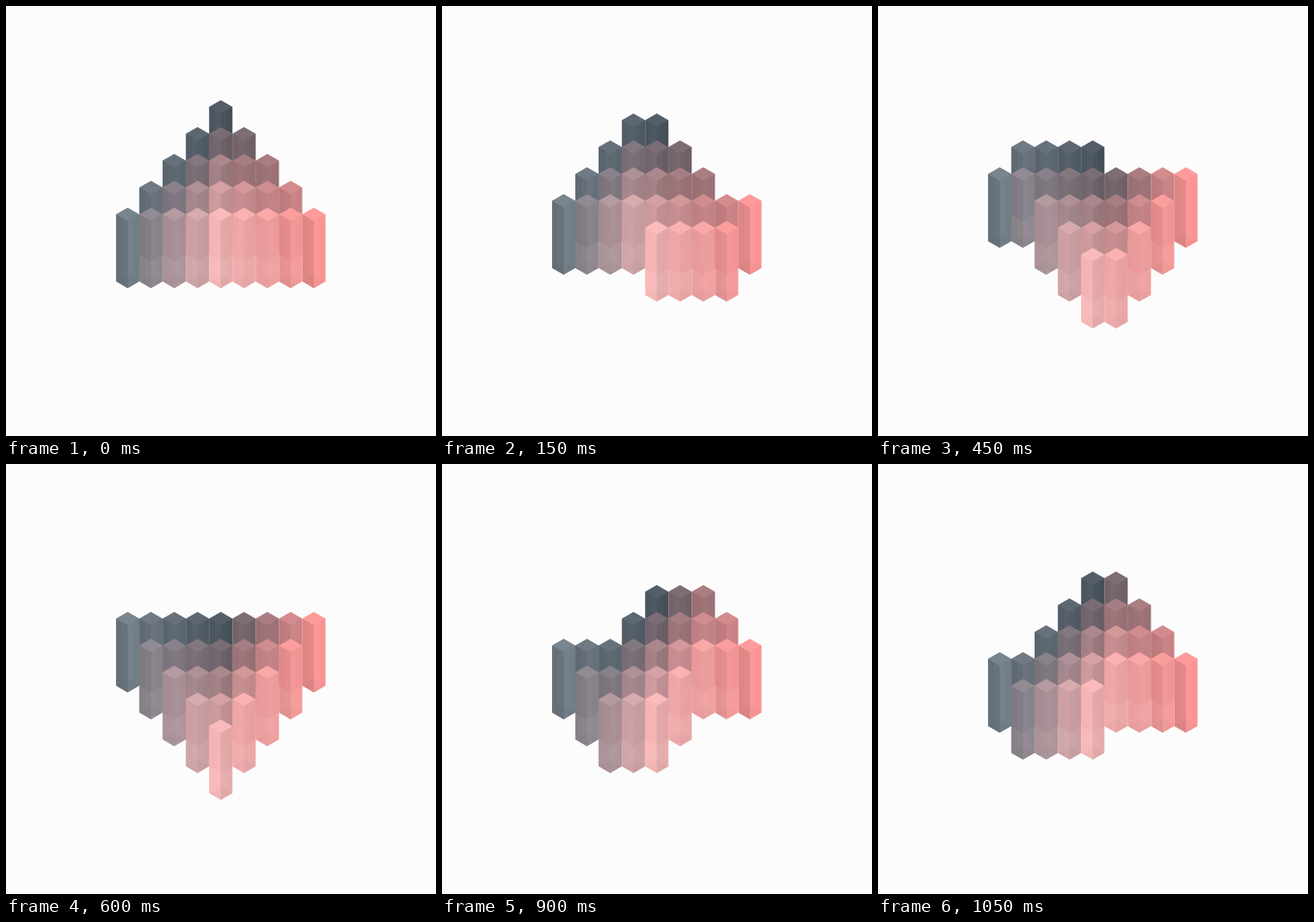
Write an HTML page with a canvas that moves like this. It is 500 by 500 pixels and loops after 1.2 s.

```html
<!DOCTYPE html>
<html lang="en">
<head>
<meta charset="utf-8">
<title>Prism wave</title>
<style>
  html, body { margin: 0; width: 100%; height: 100%; overflow: hidden; background: #fcfcfc; }
  canvas { display: block; width: 500px; height: 500px; }
</style>
</head>
<body>
<canvas id="stage" width="500" height="500"></canvas>
<script>
const ctx = document.getElementById('stage').getContext('2d');
const STEP_MS = 150, STEPS = 8, SIZE = 5;
const U = 15.625;                    // vertical grid unit
const W = U * Math.sqrt(3) / 2;      // half width of a prism
const CX = 249.75, CY = 250;

const CORNERS = {
  back: [66, 78, 89], right: [255, 145, 145],
  left: [107, 119, 131], front: [255, 188, 188]
};

const mix = (a, b, k) => a.map((v, n) => v + (b[n] - v) * k);
const rgb = c => `rgb(${c.map(Math.round)})`;

function fill(points, style) {
  ctx.fillStyle = style;
  ctx.beginPath();
  points.forEach(([x, y]) => ctx.lineTo(x, y));
  ctx.fill();
}

const prisms = [];
for (let i = 0; i < SIZE; i++) {
  for (let j = 0; j < SIZE; j++) {
    const u = i / (SIZE - 1), v = j / (SIZE - 1);
    const color = mix(mix(CORNERS.back, CORNERS.right, u), mix(CORNERS.left, CORNERS.front, u), v);
    prisms.push({ col: i - j, depth: i + j, color: rgb(color) });
  }
}
prisms.sort((a, b) => a.depth - b.depth);

// Triangle wave over eight columns, from -2 to 2.
const wave = n => Math.abs(((n + 4) % 8 + 8) % 8 - 4) - 2;

function drawPrism({ col, depth, color }, step) {
  const x = CX + col * 2 * W;
  const y = CY + (depth - 4 - 3 + wave(col + step)) * U;
  const l = x - W, r = x + W;
  const side = y + U / 2, front = y + U;
  const low = y + 5.5 * U, bottom = y + 6 * U;

  ctx.globalAlpha = 0.94;
  fill([[x, y], [r, side], [r, low], [x, bottom], [l, low], [l, side]], color);
  ctx.globalAlpha = 1;

  const leftFace = [[l, side], [x, front], [x, bottom], [l, low]];
  const rightFace = [[r, side], [x, front], [x, bottom], [r, low]];
  const edge = Math.abs(col) / 4;
  fill(leftFace, `rgba(0,0,0,${0.03 + 0.09 * edge})`);
  fill(rightFace, `rgba(0,0,0,${0.1 - 0.08 * edge})`);
  fill([[x, y], [r, side], [x, front], [l, side]], 'rgba(255,255,255,0.04)');

  // Faint inner core and base seen through the faces.
  const h = W * 0.5;
  fill([[x - h, front - U / 4], [x, front], [x + h, front - U / 4],
        [x + h, bottom - U / 4], [x, bottom], [x - h, bottom - U / 4]], 'rgba(255,255,255,0.025)');
  fill([[x, bottom - U], [r, low], [x, bottom], [l, low]], 'rgba(0,0,0,0.025)');
}

function draw() {
  const step = Math.floor(performance.now() / STEP_MS) % STEPS;
  ctx.fillStyle = '#fcfcfc';
  ctx.fillRect(0, 0, 500, 500);
  prisms.forEach(p => drawPrism(p, step));
  requestAnimationFrame(draw);
}
draw();
</script>
</body>
</html>
```
